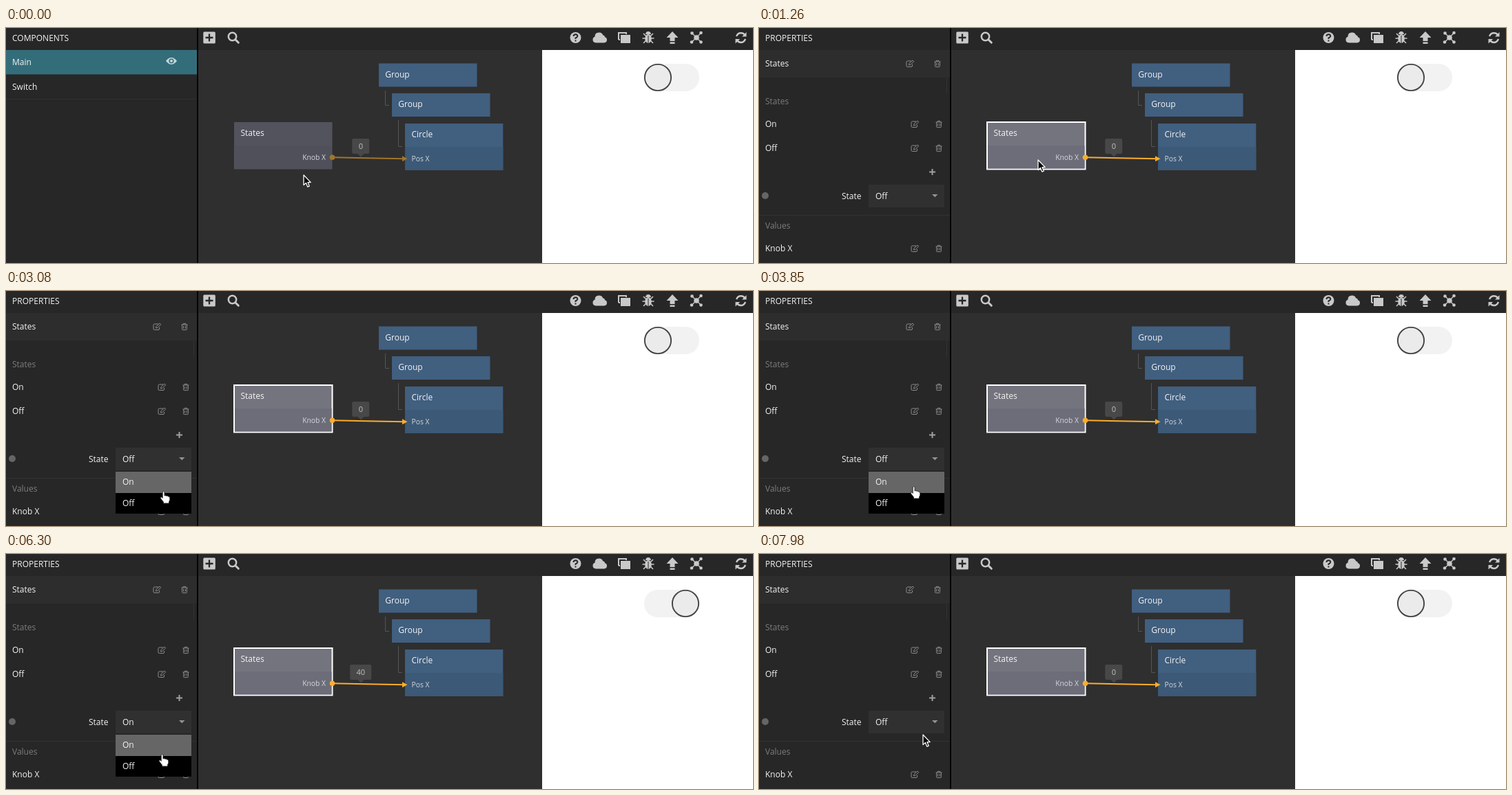
Write an HTML page that moves like this. It is 1084 px wide and 342 px high and loops after 8000 ms.

```html
<!DOCTYPE html>
<html lang="en">
<head>
<meta charset="utf-8">
<title>Switch states</title>
<style>
  html, body { margin: 0; width: 100%; height: 100%; overflow: hidden; background: #2f2f2f; }
  svg { display: block; width: 100%; height: 100%; }
  text { font: 12px "Open Sans", "Noto Sans", sans-serif; fill: #f4f4f4; }
  .heading { fill: #7d7d7d; }
  .port { font-size: 10.3px; fill: #d4d8de; }
  .icons { fill: #c9c9c9; }
  .stroke { fill: none; stroke: #c9c9c9; }
  .tool { fill: none; stroke: #8c8c8c; stroke-width: 1; }
  .group { fill: #415f7f; }
  .tree { fill: none; stroke: #555; }
  #wire { stroke: var(--wire); fill: var(--wire); }
</style>
</head>
<body>
<svg viewBox="0 0 1084 342">
  <defs>
    <g id="edit" class="tool">
      <path d="M2 -4H-3.5Q-5 -4 -5 -2.5V3Q-5 4.5 -3.5 4.5H2Q3.5 4.5 3.5 3V1"/>
      <path d="M-1.5 2L-1 -.5L4 -5L5.7 -3.3L1 1.5Z"/>
    </g>
    <g id="trash" class="tool">
      <path d="M-4.5 -3H4.5M-1.8 -3V-4.6H1.8V-3M-3.4 -3V3.7Q-3.4 4.6 -2.5 4.6H2.5Q3.4 4.6 3.4 3.7V-3M-1.4 -1V2.7M1.4 -1V2.7"/>
    </g>
    <path id="arrow" d="M0 0V14.6L3.4 11.4L5.8 17.2L8.2 16.2L5.9 10.6H10.2Z" fill="#000" stroke="#fff" stroke-width="1.3" stroke-linejoin="round"/>
    <path id="hand" d="M-1.8 1Q-1.8 -.4 -.4 -.4T1 1V6Q2.4 4.9 3.7 6.3Q5.4 5.4 6.4 7Q8.8 6.7 8.8 9V11.5Q8.8 13 7.6 14.4V17H-.6V15L-4.6 9.8Q-5.3 8.4 -4.2 7.9T-1.8 9.4Z" fill="#fff" stroke="#222" stroke-width=".9" stroke-linejoin="round"/>
  </defs>

  <!-- sidebar -->
  <rect width="278" height="342" fill="#272727"/>
  <g id="components">
    <text x="9" y="19">COMPONENTS</text>
    <rect y="32" width="278" height="35.5" fill="#346d7a"/>
    <text x="9" y="54">Main</text>
    <path d="M232 48Q240 38 248 48Q240 58 232 48Z" fill="#c5d7db"/>
    <circle cx="240" cy="48" r="3.6" fill="#346d7a"/>
    <circle cx="240" cy="48" r="2" fill="#c5d7db"/>
    <text x="9" y="90">Switch</text>
    <path d="M0 103.5H278" stroke="#303030"/>
  </g>
  <g id="properties">
    <text x="9" y="19">PROPERTIES</text>
    <rect y="32" width="278" height="40" fill="#2d2d2d"/>
    <path d="M272.5 72V96M0 272.5H278" stroke="#323232"/>
    <text x="9" y="56">States</text>
    <text x="9" y="111" class="heading">States</text>
    <text x="9" y="144">On</text>
    <text x="9" y="179">Off</text>
    <path d="M247 209.5H256M251.5 205V214" stroke="#a0a0a0" stroke-width="2"/>
    <circle cx="9" cy="244" r="5" fill="#656565"/>
    <text x="120" y="249">State</text>
    <rect x="159" y="228" width="110" height="33" fill="#303030"/>
    <text id="value" x="169" y="249"></text>
    <path d="M251 242H259.5L255.3 246.300Z" fill="#939393"/>
    <text x="9" y="292" class="heading">Values</text>
    <text x="9" y="325">Knob X</text>
    <g id="rowTools"></g>
    <g id="menu">
      <rect id="itemOn" x="159" y="263" width="110" height="31"/>
      <rect id="itemOff" x="159" y="294" width="110" height="30"/>
      <text x="169" y="282">On</text>
      <text x="169" y="313">Off</text>
    </g>
  </g>

  <!-- toolbar -->
  <rect x="277" width="2" height="342" fill="#050505"/>
  <rect x="279" width="805" height="32" fill="#272727"/>
  <g class="icons">
    <rect x="286.300" y="5.500" width="17.500" height="17" rx="1.500"/>
    <path d="M289.500 14H300.500M295 8.500V19.500" stroke="#272727" stroke-width="2.300"/>
    <circle class="stroke" cx="328.500" cy="12.500" r="5.700" stroke-width="2.500"/>
    <path class="stroke" d="M333 17L337.300 21.300" stroke-width="3" stroke-linecap="round"/>
    <circle cx="826.500" cy="14" r="8"/>
    <path d="M823.500 12Q823.700 9.300 826.500 9.300Q829.500 9.500 829.300 12Q829 13.500 826.500 14.500V16M826.500 17.500V19.500" fill="none" stroke="#272727" stroke-width="2"/>
    <path d="M856 21.500Q851.500 21 851.500 17Q851.500 13.500 854.500 12.800Q854.500 6.500 860.500 6.500Q865 6.500 866.300 10.500Q869 10.800 869 13.300Q872 14 872 17.300Q872 21 868 21.500Z"/>
    <path class="stroke" d="M889 17V7H900V9M889 17H891" stroke-width="2"/>
    <path d="M892 10H906V22H892Z"/>
    <path class="stroke" d="M894 13.500H904V20.500H894Z" stroke-width="1.500"/>
    <ellipse cx="932" cy="15.500" rx="4.800" ry="6.500"/>
    <path d="M928 9Q928.500 5 932 5T936 9Z"/>
    <path class="stroke" d="M923.500 15H940.500M925 8L929 12M939 8L935 12M925 22L929 18M939 22L935 18" stroke-width="1.600"/>
    <path d="M932 11V22" stroke="#272727"/>
    <path d="M967 5L975.500 14H970.500V19H963.500V14H958.500ZM963.500 20.500H970.500V23H963.500Z"/>
    <path class="stroke" d="M995.500 7.500L1002 14L1008.500 7M1002 14L995 20.500M1002 14L1008.500 20.500" stroke-width="1.400"/>
    <circle cx="1002" cy="14" r="3.800"/>
    <circle cx="995.500" cy="7.500" r="2.300"/><circle cx="1008.500" cy="7" r="2.300"/>
    <circle cx="995" cy="20.500" r="2.300"/><circle cx="1008.500" cy="20.500" r="2.300"/>
    <path class="stroke" d="M1060 12Q1062 7.300 1066.500 7.300Q1070 7.300 1072 10M1073 16Q1071 21 1066.500 21Q1063 21 1061 18" stroke-width="2.400"/>
    <path d="M1074.500 6V12.500H1068ZM1058.500 22.500V16H1065Z"/>
  </g>

  <!-- node graph -->
  <path class="tree" d="M550.500 91V112.500H556M569.500 134V172.500H575"/>
  <rect class="group" x="541" y="51.500" width="142.500" height="34"/>
  <text x="550.300" y="72">Group</text>
  <rect class="group" x="560" y="95" width="142.500" height="34"/>
  <text x="569.300" y="115">Group</text>
  <rect class="group" x="579" y="139" width="142.300" height="68"/>
  <rect x="579" y="173" width="142.300" height="34" fill="#3c5977"/>
  <text x="588.500" y="158.500">Circle</text>
  <text x="588.500" y="194" class="port">Pos X</text>
  <rect id="node" x="331" y="137" width="142.500" height="68.500"/>
  <rect id="nodeBody" x="332" y="171" width="140.500" height="33.500"/>
  <text x="340.500" y="157">States</text>
  <text x="464" y="192" class="port" text-anchor="end">Knob X</text>
  <g id="wire">
    <path d="M474 188.300L577 190.300" stroke-width="2"/>
    <circle cx="473.500" cy="188.200" r="3.800" stroke="none"/>
    <path d="M575 186.200L582.500 190.200L575 194.200Z" stroke="none"/>
  </g>
  <path id="pulse" d="M478 188.400L575 190.300" stroke="#30281b" stroke-width="1" stroke-opacity=".6" stroke-dasharray="6 8"/>
  <path d="M510 182.500H520L515 187.500Z" fill="#484848"/>
  <rect id="badge" y="161" height="22" rx="2" fill="#484848"/>
  <text id="count" x="514.800" y="176" text-anchor="middle" style="font-size:11px;fill:#c4c4c4"></text>

  <!-- preview -->
  <rect x="778" y="32" width="306" height="310" fill="#fff"/>
  <rect x="926" y="52" width="80" height="40" rx="20" fill="#f2f2f2"/>
  <circle id="knob" cy="72" r="19.100" fill="#ebebec" stroke="#444" stroke-width="1.900"/>

  <use id="cursor"/>
</svg>

<script>
const LOOP = 8000, STEP = 70;
const SELECT_AT = 420, TURN_ON = 4200, TURN_OFF = 6860;
const SLIDE = 300, PULSE = 1080;
const MENU_OPEN = [[2520, TURN_ON], [5600, TURN_OFF]];

// time, x, y of the pointer tip
const PATH = [
  [0, 432, 214], [350, 405, 192], [1260, 405, 192], [1820, 243, 242],
  [2100, 243, 242], [2240, 243, 243], [2590, 243, 243], [3080, 229, 292],
  [3290, 224, 304], [3570, 224, 304], [3850, 225, 285], [4200, 225, 285],
  [4900, 234, 267], [5460, 241, 243], [5740, 241, 243], [6300, 227, 292],
  [6650, 221, 298], [7560, 221, 298], [7980, 238, 263], [LOOP, 238, 263]
];

const $ = id => document.getElementById(id);
const clamp = v => Math.min(1, Math.max(0, v));
const ease = v => v * v * (3 - 2 * v);
const within = (t, start, end) => t >= start && t < end;
const set = (id, attrs) => {
  for (const name in attrs) $(id).setAttribute(name, attrs[name]);
};
const show = (id, on) => { $(id).style.display = on ? '' : 'none'; };

$('rowTools').innerHTML = [[219, 259, 52], [226, 261, 140], [226, 261, 175], [226, 261, 321]]
  .map(([edit, trash, y]) => `<use href="#edit" x="${edit}" y="${y}"/><use href="#trash" x="${trash}" y="${y}"/>`)
  .join('');

function pointer(t) {
  const i = PATH.findIndex(p => p[0] > t);
  const [t0, x0, y0] = PATH[i - 1], [t1, x1, y1] = PATH[i];
  const k = ease((t - t0) / (t1 - t0));
  return [x0 + (x1 - x0) * k, y0 + (y1 - y0) * k];
}

function draw(t) {
  const selected = t >= SELECT_AT;
  const open = MENU_OPEN.some(([start, end]) => within(t, start, end));
  const [x, y] = pointer(t);

  show('components', !selected);
  show('properties', selected);
  show('menu', open);
  $('value').textContent = within(t, TURN_ON, TURN_OFF) ? 'On' : 'Off';
  set('itemOn', { fill: y < 294 ? '#666' : '#000' });
  set('itemOff', { fill: y < 294 ? '#000' : '#666' });

  set('node', selected
    ? { fill: '#74747f', stroke: '#fff', 'stroke-width': 2 }
    : { fill: '#53535e', stroke: 'none' });
  set('nodeBody', { fill: selected ? '#6c6d78' : '#50505b' });
  $('wire').style.setProperty('--wire', selected ? '#fcad2c' : '#a0752e');
  show('pulse', [TURN_ON, TURN_OFF].some(start => within(t, start, start + PULSE)));
  set('pulse', { 'stroke-dashoffset': -t * 0.04 });

  const offset = 40 * (ease(clamp((t - TURN_ON) / SLIDE)) - ease(clamp((t - TURN_OFF) / SLIDE)));
  const count = String(Math.round(offset));
  const width = 19 + 6 * count.length;
  $('count').textContent = count;
  set('badge', { x: 514.7 - width / 2, width });
  set('knob', { cx: 946 + offset });

  set('cursor', { href: open && y > 263 ? '#hand' : '#arrow', x, y });
}

const start = performance.now();
function tick() {
  const t = (performance.now() - start) % LOOP;
  draw(Math.floor(t / STEP) * STEP);
  requestAnimationFrame(tick);
}
tick();
</script>
</body>
</html>
```
